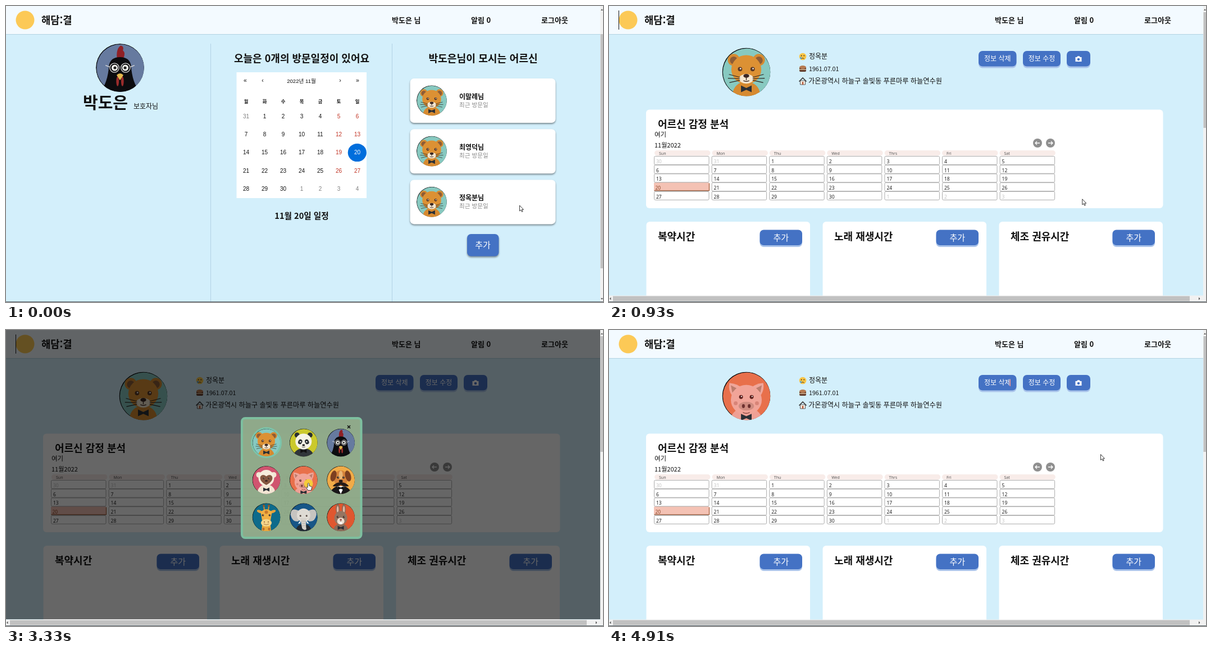
These frames come from a looping animation (1063 by 527 pixels, 4970 ms). An HTML page:

```html
<!DOCTYPE html>
<html lang="ko">
<head>
<meta charset="utf-8">
<style>
html, body { margin: 0; width: 100%; height: 100%; overflow: hidden; background: #d3effb; }
svg { display: block; font-family: "Noto Sans CJK KR", "Noto Sans CJK", "Noto Sans", sans-serif; }
.latin { font-family: "Noto Sans", sans-serif; }
.arial { font-family: "Liberation Sans", Arial, "Noto Sans CJK KR", sans-serif; }
.raised { filter: drop-shadow(0 2px 1.5px rgba(0, 0, 0, .42)); }
</style>
</head>
<body>
<svg id="stage" width="1063" height="527" viewBox="0 0 1063 527"></svg>
<script>
const LOOP = 4970, OPEN_PAGE = 860, OPEN_MODAL = 1990, PICK = 3390;
const BLUE = '#4472c4', INK = '#111';
const stage = document.getElementById('stage');
const $ = id => document.getElementById(id);
const rect = (x, y, w, h, fill, r = 0, more = '') =>
  `<rect x="${x}" y="${y}" width="${w}" height="${h}" rx="${r}" fill="${fill}" ${more}/>`;
const oval = (x, y, rx, ry, fill, more = '') =>
  `<ellipse cx="${x}" cy="${y}" rx="${rx}" ry="${ry}" fill="${fill}" ${more}/>`;
const dot = (x, y, r, fill, more) => oval(x, y, r, r, fill, more);
const path = (d, fill, more = '') => `<path d="${d}" fill="${fill}" ${more}/>`;
const line = (d, color, w = 1) => path(d, 'none', `stroke="${color}" stroke-width="${w}"`);
const text = (s, x, y, size, { bold, fill = INK, mid, cls = '' } = {}) =>
  `<text x="${x}" y="${y}" font-size="${size}" fill="${fill}" class="${cls}"` +
  `${bold ? ' font-weight="700"' : ''}${mid ? ' text-anchor="middle"' : ''}>${s}</text>`;
const title = (s, x, y, size = 18, mid = false) => text(s, x, y, size, { bold: true, mid });
const pair = f => f(-1) + f(1);

// Animals live in a disc of radius 50 around the origin
const bow = (y, c = '#2b3036') => path(`M-11 ${y - 7}L0 ${y - 2}L11 ${y - 7}V${y + 7}L0 ${y + 2}L-11 ${y + 7}Z`, c);
const eyes = (x, y, r = 3.6, c = '#33231c') => pair(s => dot(s * x, y, r, c) + dot(s * x + 1, y - 1, r / 3, '#fff'));
const animals = {
  bear: ['#87c9c0',
    pair(s => dot(s * 26, -25, 12.5, '#d68a30') + dot(s * 26, -24, 8, '#8d5c36')) +
    oval(0, 45, 28, 25, '#d68a30') + oval(0, -5, 31, 30, '#dc9134') +
    eyes(13, -6, 4.5, '#5a3925') + oval(0, 14, 15, 10, '#f4e6cf') + oval(0, 8, 6, 4, '#3a2723') +
    line('M0 10V17M-6 18Q0 21 6 18', '#3a2723', 1.6) +
    pair(s => line(`M${s * 13} 11L${s * 36} 5M${s * 13} 14L${s * 38} 13M${s * 13} 17L${s * 35} 22`, '#2c2420', 1.3)) + bow(35)],
  panda: ['#cbc92c',
    pair(s => dot(s * 23, -27, 9, '#2b3033')) + oval(0, 47, 35, 27, '#30363a') +
    oval(0, -4, 29, 28, '#f5f3e6') + pair(s => oval(s * 12, -3, 7, 9, '#2b3033', `transform="rotate(${s * -25} ${s * 12} -3)"`)) +
    eyes(11, -3, 2.5, '#fff') + oval(0, 9, 5, 3.5, '#222') + line('M-6 15Q0 19 6 15', '#222', 1.5) + bow(30, '#111')],
  rooster: ['#667a9f',
    path('M-6 -18Q-9 -38 1 -46Q9 -45 6 -36Q13 -30 6 -18Z', '#8f2026') +
    path('M-41 50Q-25 30 -23 -4Q-20 -22 0 -22Q20 -22 23 -4Q25 30 41 50Z', '#0c0c0f') +
    pair(s => dot(s * 11.5, 0, 9.5, '#0c0c0f', 'stroke="#d9d9d9" stroke-width="1.6"') +
      dot(s * 11, 0, 6.5, '#f3f3ee') + dot(s * 10.5, 0, 3, '#222')) +
    pair(s => oval(s * 5, 28, 2.8, 10, '#9b2c2c')) + path('M-7 15Q0 8 7 15L0 26Z', '#e5b84e') +
    line('M-22 -2L-30 -5M22 -2L30 -5', '#ddd', 1.6)],
  monkey: ['#d0546f',
    pair(s => dot(s * 26, -18, 10, '#f2e5d3')) + oval(0, 44, 31, 28, '#f2e5d3') + oval(0, -7, 28, 29, '#f6ecdc') +
    path('M0 18Q-26 4 -21 -12Q-14 -23 0 -13Q14 -23 21 -12Q26 4 0 18Z', '#845741') +
    eyes(9, -6, 3) + oval(0, 3, 5, 3, '#3a2723') + bow(34)],
  pig: ['#e8704b',
    pair(s => path(`M${s * 35} -27Q${s * 18} -25 ${s * 10} -17L${s * 29} 0Q${s * 38} -12 ${s * 35} -27Z`, '#efa69a') +
      path(`M${s * 32} -22L${s * 20} -16L${s * 29} -7Z`, '#bc7c6c')) +
    oval(0, 48, 32, 24, '#efa095') + oval(0, 8, 32, 31, '#f1a498') +
    pair(s => dot(s * 22, 15, 4, '#d88477')) + eyes(11, 2, 4, '#5c1f1c') +
    oval(0, 21, 16, 9, '#cf8c80') + pair(s => oval(s * 6, 21, 3, 4, '#6e3230')) +
    line('M-7 34Q0 38 7 34', '#7b3a35', 1.5) + bow(44)],
  dog: ['#f1ab48',
    oval(0, 50, 37, 29, '#191719') + path('M-13 22H13L0 50Z', '#fff') + oval(0, -6, 25, 28, '#d6833b') +
    pair(s => oval(s * 26, -14, 10, 20, '#7d3f20', `transform="rotate(${s * -15} ${s * 26} -14)"`)) +
    oval(0, -17, 7, 16, '#e9b676') + eyes(10, -9, 4) + oval(0, 4, 7, 5, '#241a18') +
    path('M0 8Q-18 8 -29 22Q-10 26 0 17Q10 26 29 22Q18 8 0 8Z', '#241a18') + bow(29, '#111')],
  giraffe: ['#0d6b8b',
    pair(s => line(`M${s * 7} -25L${s * 9} -41`, '#d98b2f', 4) + dot(s * 9, -41, 4, '#8d5429') +
      oval(s * 23, -20, 11, 5, '#e5a23c', `transform="rotate(${s * -20} ${s * 23} -20)"`)) +
    path('M-17 50L-13 10H13L17 50Z', '#e9a93e') + path('M-20 -18Q0 -38 20 -18L14 18H-14Z', '#f0b044') +
    oval(0, 20, 19, 13, '#f6d58a') + pair(s => dot(s * 7, 17, 2, '#8d5429') + oval(s * 10, 42, 4, 5, '#b96e2c')) +
    dot(0, -18, 6, '#c97a2c') + eyes(12, -7) + line('M-9 24Q0 30 9 24', '#8d5429', 1.5)],
  elephant: ['#175687',
    pair(s => path(`M${s * 12} -20Q${s * 46} -39 ${s * 46} -9Q${s * 40} 20 ${s * 17} 14Z`, '#c6c4c0')) +
    oval(0, 48, 27, 24, '#222b34') + oval(0, -7, 24, 24, '#dedbd4') +
    path('M-11 3H11Q7 25 10 43Q3 49 -5 40Q-9 23 -11 3Z', '#d5d1ca') + eyes(11, -5, 3) +
    line('M-7 14H8M-6 22H7M-5 30H7', '#aaa6a0', 1.3) + pair(s => path(`M${s * 10} 11L${s * 20} 23L${s * 12} 22Z`, '#fff'))],
  rabbit: ['#e0572f',
    pair(s => oval(s * 11, -29, 7, 18, '#8b6b58') + oval(s * 11, -27, 3.5, 13, '#e3b8a6')) +
    oval(0, 45, 25, 22, '#8b6b58') + oval(0, 3, 23, 25, '#957461') + oval(0, 14, 13, 12, '#eee0d1') +
    eyes(11, -1, 3.5) + oval(0, 9, 4, 3, '#a44e48') + line('M0 11V17', '#542f2b', 1.3) +
    rect(-4, 17, 8, 7, '#fff') + bow(38)]
};
const defs = '<clipPath id="disc"><circle r="50"/></clipPath>' +
  Object.entries(animals).map(([name, [bg, body]]) =>
    `<g id="${name}" clip-path="url(#disc)">${dot(0, 0, 50, '#0b0d0f') + dot(.7, .5, 49.1, bg)}${body}</g>`).join('');
const avatar = (name, x, y, r, more = '') =>
  `<g transform="translate(${x} ${y}) scale(${r / 50})" ${more}><use href="#${name}"/></g>`;

const label = (s, x, y, w, h, size) =>
  text(s, x + w / 2, y + h / 2 + size * .37, size, { fill: '#fff', mid: true });
const button = (s, x, y, w, h, size) =>
  rect(x, y + 3, w, h, '#a9c3ea', 7) + rect(x, y, w, h, BLUE, 7) + label(s, x, y, w, h, size);

const header = rect(0, 0, 1058, 50, '#f3faff') + rect(0, 50, 1058, 1, '#b3d3e2') +
  dot(34, 25, 16.5, '#fcc956') + title('해담:결', 63, 32, 17.7) +
  title('박도은 님', 687, 30, 13) + title('알림 0', 828, 30, 13) + title('로그아웃', 953, 30, 13);

function homeCalendar() {
  const arial = { cls: 'arial', mid: true };
  let out = rect(410.5, 118, 231.5, 224, '#fff') + text('2022년 11월', 526, 137, 9.6, arial);
  [['«', 426], ['‹', 457], ['›', 595], ['»', 626]].forEach(([s, x]) => out += text(s, x, 136, 10.5, arial));
  [...'월화수목금토일'].forEach((s, i) => out += text(s, 427.5 + 33 * i, 172.5, 8.3, { ...arial, bold: true }));
  out += oval(625.3, 261, 16.6, 16.1, '#006edc');
  for (let i = 0; i < 35; i++) {
    const outside = i === 0 || i > 30, col = i % 7;
    const n = i === 0 ? 31 : i > 30 ? i - 30 : i;
    const fill = i === 20 ? '#fff' : outside ? '#808080' : col > 4 ? '#c13323' : INK;
    out += text(n, 427.5 + 33 * col, 200 + 32.2 * (i / 7 | 0), 10, { ...arial, fill });
  }
  return out;
}

const elder = (name, i) => {
  const y = 129 + 90.2 * i;
  return rect(719.5, y, 259, 79, '#fff', 7, 'class="raised"') + avatar('bear', 758, y + 39.3, 27) +
    text(name, 807, y + 37, 12, { bold: true }) + text('최근 방문일', 807, y + 50.5, 10.6, { fill: '#8a8a8a' });
};

const home = rect(364, 67, 1, 460, '#b2d2e5') + rect(687, 67, 1, 460, '#b2d2e5') +
  avatar('rooster', 203, 110, 43) + title('박도은', 137, 183, 29) + text('보호자님', 227, 183, 12) +
  title('오늘은 0개의 방문일정이 있어요', 526.5, 99.5, 18, true) + homeCalendar() +
  title('11월 20일 일정', 526.5, 379, 14.6, true) + title('박도은님이 모시는 어르신', 849.5, 99.5, 18.2, true) +
  ['이말례님', '최영덕님', '정옥분님'].map(elder).join('') +
  rect(821, 406, 56.5, 39.5, BLUE, 7, 'class="raised"') + label('추가', 821, 406, 56, 39, 15) +
  rect(858, 351, 1, 12, '#444', 0, 'id="textCaret"');

const icons =
  dot(345, 90, 6.3, '#f9c646') + pair(s => dot(345 + s * 2.3, 88.5, 1, '#4b3522')) +
  line('M342.5 94Q345 91 347.5 94', '#4b3522') + oval(341.5, 92.5, 1.3, 2, '#4aa5e8') +
  rect(339, 109, 12, 8, '#5f3828', 2) + oval(345, 109, 6, 3, '#b67a51') + rect(339, 112.5, 12, 1.4, '#e6c8a4') +
  path('M340.5 133H349.5V140H340.5Z', '#f6f1e8', 'stroke="#333" stroke-width=".8"') +
  line('M338.5 134.5L345 128L351.5 134.5', '#3a3a3a', 1.6) + rect(343.7, 135, 2.6, 5, '#b65b3c');

const cellX = c => 80.5 + 102.6 * c, cellY = r => 267.5 + 15.7 * r;
function moodCalendar() {
  let out = '';
  ['Sun', 'Mon', 'Thu', 'Wed', 'Thrs', 'Fri', 'Sat'].forEach((s, i) => {
    out += rect(81 + 102.4 * i, 257, 99.5, 9.5, '#f8ece9', 4.7) +
      text(s, 89 + 102.4 * i, 264.5, 7, { cls: 'latin', fill: '#555' });
  });
  for (let i = 0; i < 35; i++) {
    const x = cellX(i % 7), y = cellY(i / 7 | 0), outside = i < 2 || i > 31;
    const n = i < 2 ? 30 + i : i > 31 ? i - 31 : i - 1, today = i === 21;
    out += rect(x, y, 97.5, 15, '#fff', 2, `id="cell${i}" stroke="#aaa"`);
    if (today) out += rect(x - .5, y, 98.5, 14, '#f4c2b4', 2) +
      line(`M${x} ${y + 14}H${x + 98}V${y + 1}`, '#a5603f', 1.3);
    out += text(n, x + (today ? 2 : 3.5), y + 12.3, 8.5,
      { cls: 'latin', fill: today ? '#8c4a2c' : outside ? '#c4c4c4' : '#222' });
  }
  return out;
}
const arrow = (x, s) => dot(x, 244, 8, '#8f8f8f') +
  line(`M${x - 4 * s} 244H${x + 4 * s}M${x + s} 241L${x + 4 * s} 244L${x + s} 247`, '#fff', 1.3);
const camera = path('M830.5 91H833L834.5 89.2H837.5L839 91H841.5V99H830.5Z', '#fff') + dot(836, 95, 2.3, BLUE);

const profile = avatar('bear', 244.5, 117.5, 43, 'id="bearFace"') + avatar('pig', 244.5, 117.5, 43, 'id="pigFace"') +
  icons + text('정옥분', 356, 94, 12) + text('1961.07.01', 356, 116, 10.7) +
  text('가온광역시 하늘구 솔빛동 푸른마루 하늘연수원', 355, 138, 12.2) +
  button('정보 삭제', 658, 80, 67.5, 27.5, 12) + button('정보 수정', 737, 80, 67, 27.5, 12) +
  button('', 815, 80, 42, 27.5, 12) + camera + rect(713.5, 88, 1.5, 12, '#e0898f', 0, 'id="redMark"') +
  rect(66, 184.5, 920.5, 175.5, '#fff', 6) + title('어르신 감정 분석', 87, 217) +
  text('여기', 81, 233, 11.5) + text('11월2022', 81, 252, 11) + arrow(763, -1) + arrow(786, 1) + moodCalendar() +
  ['복약시간', '노래 재생시간', '체조 권유시간'].map((s, i) => {
    const x = 66.5 + 314 * i;
    return rect(x, 384, 291.5, 150, '#fff', 6) + title(s, x + 20.5, 417) + button('추가', x + 202, 398.5, 75.5, 27.5, 15);
  }).join('');

const modal = rect(0, 0, 1058, 515, '#000', 0, 'opacity=".6"') +
  rect(420, 157, 212.5, 213, 'rgba(148,176,142,.92)', 6, 'stroke="#7dbf9f" stroke-width="4"') +
  line('M608 170L613 175M613 170L608 175', '#111', 1.6) +
  Object.keys(animals)
    .map((name, i) => avatar(name, 463.5 + 66.3 * (i % 3), 200.5 + 66.4 * (i / 3 | 0), 25)).join('') +
  dot(463.5, 200.5, 26, 'none', 'stroke="#7cc4aa" stroke-width="3"');

const scrollbars = rect(1058, 0, 5, 527, '#f1f1f1') + rect(1058.5, 0, 4.5, 0, '#c1c1c1', 0, 'id="thumb"') +
  path('M1059 8L1061 5L1063 8ZM1059 520L1061 523L1063 520Z', '#666') +
  `<g id="sideBar">${rect(0, 515.5, 1063, 11, '#f1f1f1') + rect(7, 516.5, 1027, 9, '#c1c1c1')}` +
  path('M3.5 518.5L1 521L3.5 523.5ZM1050 518.5L1052.5 521L1050 523.5Z', '#555') + '</g>' +
  rect(0, 526, 1063, 1, '#59646b');

const pointer = path('M0 0V10L2.4 8L4 11.5L5.6 10.8L4.1 7.4H7Z', '#fff', 'stroke="#222" stroke-width=".9" id="arrowTip"') +
  `<g id="hand">${dot(0, 1, 8, '#f5cc3c', 'id="press"')}` +
  path('M-1.3 1Q0 -1 1.3 1V5L5 6Q6.3 6.5 6 8L5 13H-1L-4 8Q-3.4 6.5 -1.3 8Z', '#fff', 'stroke="#222" stroke-width=".9"') + '</g>';

stage.innerHTML = `<defs>${defs}</defs>` + rect(0, 0, 1063, 527, '#d3effb') + header +
  `<g id="home">${home}</g><g id="profile">${profile}</g>` + rect(17, 8, 1, 34, '#111', 0, 'id="caret"') +
  `<g id="modal">${modal}</g>` + scrollbars + `<g id="pointer">${pointer}</g>`;

// Pointer track: time, x, y
const track = [[0, 914.5, 355], [810, 914.5, 355], [930, 844.5, 344.5], [1200, 376, 148], [1420, 272, 131],
  [1790, 252, 126.5], [2400, 252, 126.5], [2660, 588, 279], [2920, 538.5, 272.5], [3460, 538.5, 272.5],
  [3700, 690, 316], [3910, 898, 240], [4050, 897, 221], [4380, 875.5, 221.5], [LOOP, 875.5, 221.5]];
const blinks = [200, 730, OPEN_PAGE, 1460, 1990, 2520, 3050, 3650, 4250, 4780];

function pointerAt(t) {
  const i = track.findIndex(k => k[0] > t);
  const [t0, x0, y0] = track[i - 1], [t1, x1, y1] = track[i];
  const p = (t - t0) / (t1 - t0);
  return [x0 + (x1 - x0) * p, y0 + (y1 - y0) * p];
}

const show = (id, on) => $(id).setAttribute('display', on ? 'inline' : 'none');
let hovered = null;

function draw(t) {
  const onProfile = t >= OPEN_PAGE, isOpen = t >= OPEN_MODAL && t < PICK, picked = t >= PICK;
  const [x, y] = pointerAt(t), hand = t > 2600 && t < 3520;
  show('home', !onProfile);
  show('profile', onProfile);
  show('sideBar', onProfile);
  show('modal', isOpen);
  show('bearFace', !picked);
  show('pigFace', picked);
  show('redMark', picked);
  show('textCaret', t >= 800);
  show('caret', blinks.filter(b => b <= t).length % 2);
  show('arrowTip', !hand);
  show('hand', hand);
  show('press', t >= 3260 && t < PICK);
  $('thumb').setAttribute('y', onProfile ? 11 : 50);
  $('thumb').setAttribute('height', onProfile ? 206 : 417);
  $('pointer').setAttribute('transform', `translate(${x} ${y})`);

  if (hovered) hovered.setAttribute('stroke', '#aaa');
  const col = Math.floor((x - cellX(0)) / 102.6), row = Math.floor((y - cellY(0)) / 15.7);
  hovered = onProfile && !isOpen && col >= 0 && col < 7 && row >= 0 && row < 5 ? $('cell' + (row * 7 + col)) : null;
  if (hovered) hovered.setAttribute('stroke', '#fff');
}

const start = performance.now();
function tick() {
  draw((performance.now() - start) % LOOP);
  requestAnimationFrame(tick);
}
tick();
</script>
</body>
</html>
```
